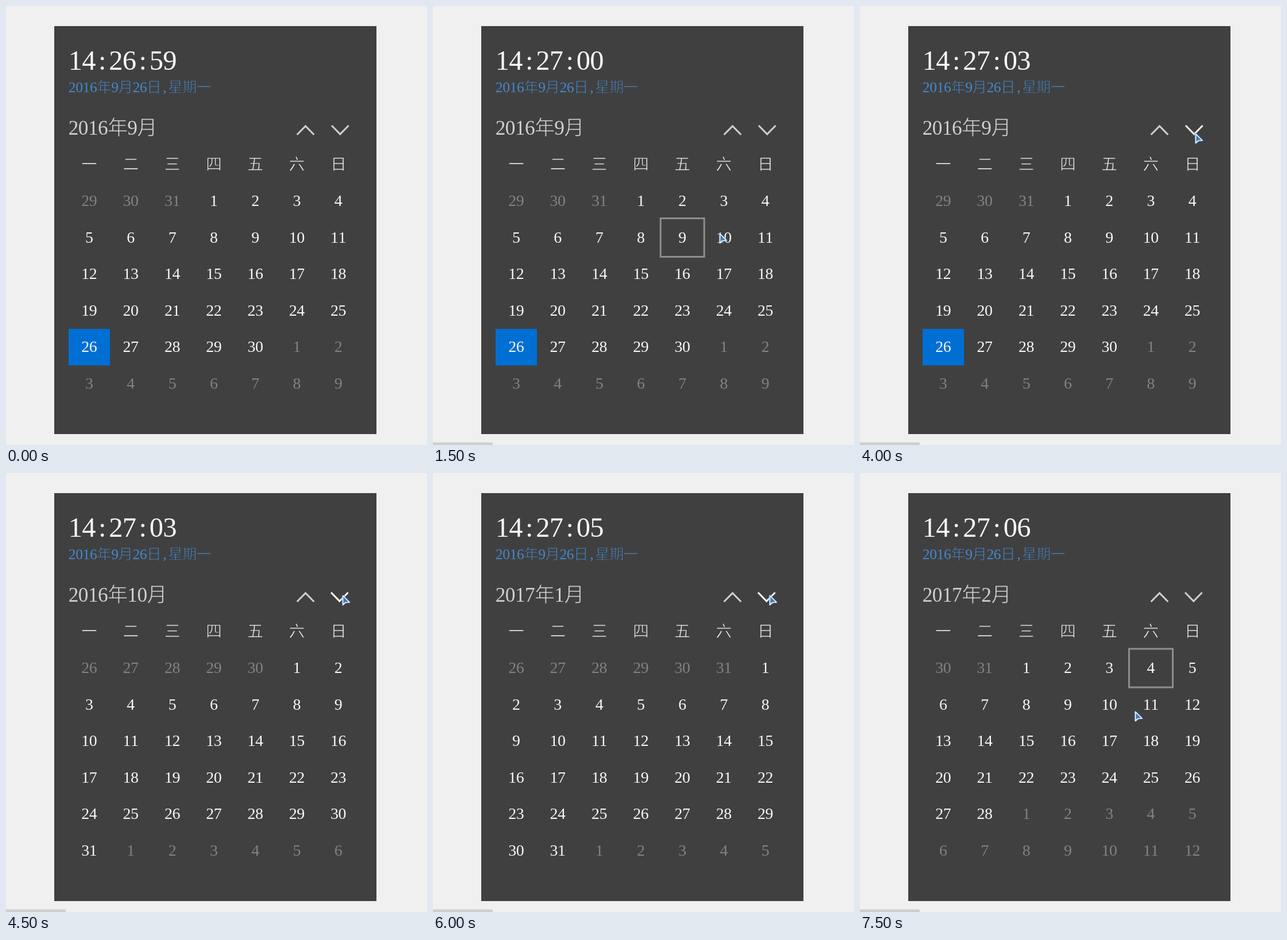
These frames come from a looping animation (733x764 px, 8000 ms). An HTML page:

```html
<!DOCTYPE html>
<html lang="zh">
<head>
<meta charset="utf-8">
<title>Calendar</title>
<style>
  html, body { margin: 0; height: 100%; overflow: hidden; background: #f0f0f0; }
  svg { display: block; width: 733px; height: 764px; }
  text { font-family: "Liberation Serif", "Noto Sans CJK SC", "Noto Sans CJK", serif; text-anchor: middle; }
  /* A panel-coloured outline thins the strokes of the Chinese characters. */
  .han { font-weight: 300; stroke: #404040; stroke-width: .8px; }
  path { fill: none; }
</style>
</head>
<body>
<svg id="stage" viewBox="0 0 733 764"></svg>
<script>
const stage = document.getElementById('stage');
const LOOP = 8000, STEP = 500;
const WHITE = '#f8f8f8', SOFT = '#d0d0d0', DIM = '#828282';

// Pointer tip for each step; null while it is off stage.
const pointer = [null, [358, 414], [213, 443], [498, 395], [572, 256], [194, 207], [566, 581], [143, 71],
  [583, 221], [585, 212], [585, 212], [585, 212], [585, 212], [580, 212], [484, 210], [478, 414]];
const outlined = { 1: 11, 2: 15, 3: 11, 15: 5 };
const titleColor = { 5: WHITE, 6: '#e4e4e4' };

const rect = (x, y, w, h, attrs) => `<rect x="${x}" y="${y}" width="${w}" height="${h}" ${attrs}/>`;

// Half-width cells for ASCII, full-width cells for Chinese characters.
const isHan = ch => ch > '\x7f';
const cellWidth = (ch, size) => isHan(ch) ? size : size / 2;

function label(str, x, y, size, color) {
  const glyphs = [...str].map(ch => {
    const w = cellWidth(ch, size);
    x += w;
    return `<tspan x="${(x - w / 2).toFixed(2)}"${isHan(ch) ? ' class="han"' : ''}>${ch}</tspan>`;
  });
  return `<text y="${y}" font-size="${size * 1.03}" fill="${color}">${glyphs.join('')}</text>`;
}

function centered(str, cx, y, size, color) {
  const width = [...str].reduce((sum, ch) => sum + cellWidth(ch, size), 0);
  return label(str, cx - width / 2, y, size, color);
}

const colX = i => 145 + 72.3 * (i % 7);
const rowY = i => 339.5 + 63.5 * Math.floor(i / 7);

function days(year, month, isCurrent) {
  const lead = (new Date(year, month, 1).getDay() + 6) % 7;
  let out = '';
  for (let i = 0; i < 42; i++) {
    const date = new Date(year, month, 1 - lead + i);
    const inside = date.getMonth() === month;
    if (isCurrent && inside && date.getDate() === 26)
      out += rect(109, 562, 72, 63.5, 'fill="#006fd4"');
    out += centered(String(date.getDate()), colX(i), rowY(i) + 8.5, 27, inside ? WHITE : DIM);
  }
  return out;
}

const chevron = (x, y, rise, color) =>
  `<path d="M${x} ${y}l14.8 ${rise} 14.8 ${-rise}" stroke="${color}" stroke-width="3"/>`;

const arrow = ([x, y]) => `<g transform="translate(${x} ${y})" stroke-linejoin="round">
  <path d="M1.5 1.5V17.5L6 13.5 13 13Z" stroke="#2f6db0" stroke-opacity=".55" stroke-width="4"/>
  <path d="M1.5 1.5V17.5L6 13.5 13 13Z" style="fill:#4478b0" stroke="#f2f8ff" stroke-width="1.7"/></g>`;

function draw(step) {
  const clock = new Date(2016, 8, 26, 14, 26, 59 + Math.floor(step / 2)).toTimeString().slice(0, 8);
  const shift = Math.max(0, Math.min(step, 13) - 8);
  const shown = new Date(2016, 8 + shift, 1);
  const year = shown.getFullYear(), month = shown.getMonth();
  const onNext = step >= 8 && step <= 13;

  let out = rect(84, 35, 561, 710, 'fill="#404040"')
    + label(clock, 109, 111, 47, WHITE)
    + label('2016年9月26日,星期一', 109, 150, 24.8, '#4489cc')
    + label(`${year}年${month + 1}月`, 109, 224, 34.2, titleColor[step] || SOFT)
    + chevron(506.7, 224, -15, SOFT)
    + chevron(shift ? 566 : 567, 208, 15, onNext ? WHITE : SOFT);

  [...'一二三四五六日'].forEach((ch, i) => out += centered(ch, colX(i), 285, 27, WHITE));
  out += days(year, month, !shift);

  if (step in outlined) {
    const i = outlined[step];
    out += rect(colX(i) - 38, rowY(i) - 33.5, 76, 67, 'fill="none" stroke="#8e8e8e" stroke-width="3"');
  }
  if (step >= 3) out += rect(-4, 759.5, 108, 10, 'rx="2" fill="#cecece"');
  if (pointer[step]) out += arrow(pointer[step]);
  stage.innerHTML = out;
}

let last = -1;
function tick() {
  const step = Math.floor(performance.now() % LOOP / STEP);
  if (step !== last) draw(last = step);
  requestAnimationFrame(tick);
}
tick();
</script>
</body>
</html>
```
